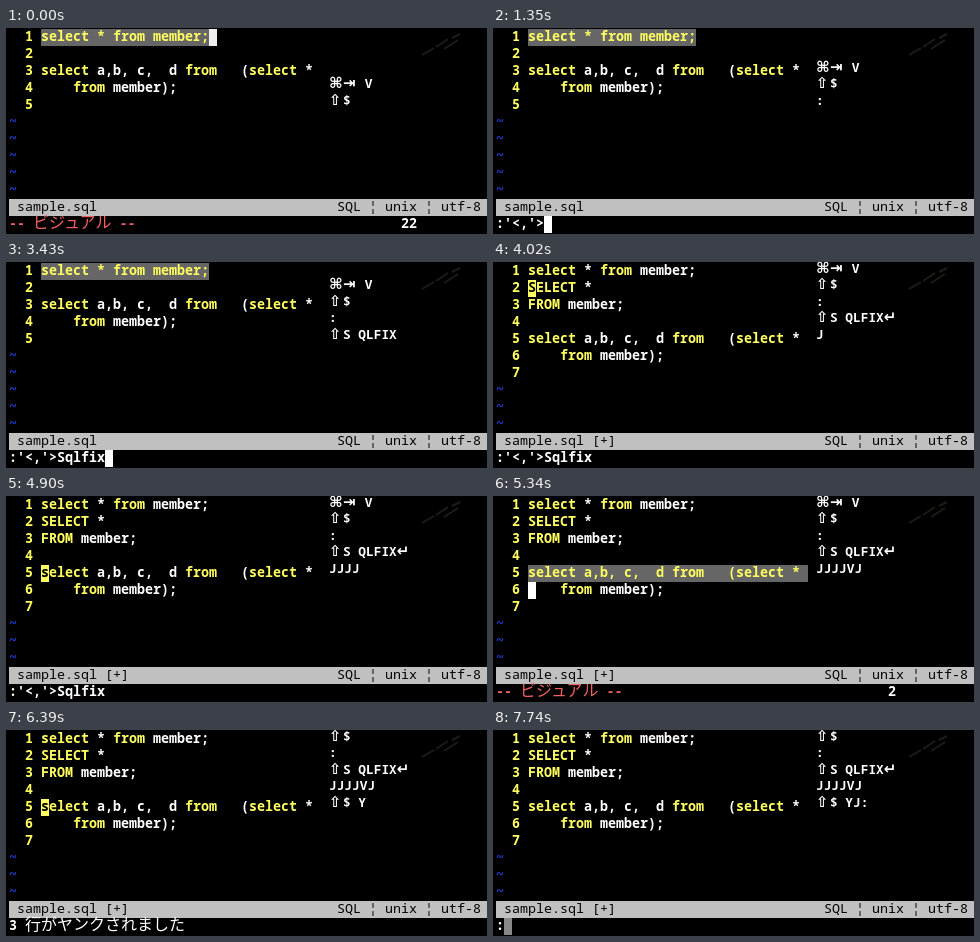
Write an HTML page that moves like this. It is 481 px wide and 206 px high and loops after 8 s.

```html
<!DOCTYPE html>
<html lang="ja">
<meta charset="utf-8">
<title>sample.sql</title>
<style>
html, body { margin: 0; width: 100%; height: 100%; overflow: hidden; background: #000; }
#stage { position: relative; width: 481px; height: 206px; overflow: hidden; }
#stage div { position: absolute; }
#stage svg { position: absolute; left: 0; top: 0; }
.text, .keys {
  white-space: pre; color: #fff; line-height: 17px;
  font: 600 13.333px/17px "Noto Sans Mono", "DejaVu Sans Mono", monospace;
}
.text b { font-weight: 600; color: #ffff60; }
.text em { font: 500 16px/0 "Noto Sans CJK JP", "Noto Sans CJK", sans-serif; }
.keys { left: 323px; font-size: 12.8px; font-weight: 700; line-height: 16.5px; }
.keys i { display: inline-block; width: 14px; font: bold 15px/0 "DejaVu Sans", sans-serif; }
</style>
<body>
<div id="stage">
  <svg width="481" height="206" fill="none" stroke="#1c1c1a" stroke-width="2">
    <path d="M416 27l12-7M430 19l12-8M438 21l14-9M446 10l8-4"/>
  </svg>
  <div id="screen"></div>
</div>
<script>
const LOOP = 8000, CELL = 8, ROW = 17, LEFT = 3, TOP = 1;
const YELLOW = '#ffff60', GREY = '#666';
const first = 'select * from member;';
const query = ['', 'select a,b, c,  d from   (select *', '    from member);', ''];
const before = [first, ...query];
const after = [first, 'SELECT *', 'FROM member;', ...query];
const range = ":'<,'>", visual = '-- ビジュアル --';

// cur: [column, row, colour]; sel: [row, length] pairs; columns count from the window edge
const at = (row, color = YELLOW) => [4, row, color];
const typed = (s, keys) => ({ cmd: range + s, cur: [6 + s.length, 11, '#fff'],
  keys: ['⌘⇥ V', '⇧$', ':', ...(keys ? [keys] : [])] });
const base = ['⌘⇥ V', '⇧$', ':', '⇧S QLFIX↵'];
const moved = (row, js, color) => ({ cur: at(row, color), keys: [...base, js] });

const steps = [
  [0, { lines: before, sel: [[0, 21]], cur: [25, 0, '#eee'], cmd: visual, count: '22', keys: ['⌘⇥ V', '⇧$'] }],
  [450, { cur: null }],
  [1350, { ...typed(''), count: '' }],
  [2100, typed('S', '⇧S')],
  [2240, typed('S', '⇧S Q')],
  [2390, typed('Sq', '⇧S Q')],
  [2540, typed('Sq', '⇧S QL')],
  [2680, typed('Sql', '⇧S QL')],
  [2980, typed('Sqlf', '⇧S QLF')],
  [3130, typed('Sqlfi', '⇧S QLFI')],
  [3280, typed('Sqlfix', '⇧S QLFI')],
  [3430, typed('Sqlfix', '⇧S QLFIX')],
  [3570, { lines: after, sel: [], cur: at(0), keys: base }],
  [4020, moved(1, 'J')],
  [4160, moved(1, 'JJ')],
  [4310, moved(2, 'JJ')],
  [4450, moved(3, 'JJJ', '#fff')],
  [4900, moved(4, 'JJJJ')],
  [5040, { ...moved(4, 'JJJJV'), cmd: visual, count: '1' }],
  [5190, { ...moved(5, 'JJJJV', '#fff'), sel: [[4, 35]], count: '2' }],
  [5340, moved(5, 'JJJJVJ', '#fff')],
  [5640, { sel: [[4, 35], [5, 17]], cur: [21, 5, '#fff'], keys: [...base, 'JJJJVJ', '⇧$'] }],
  [6390, { sel: [], cur: at(4), cmd: '3 行がヤンクされました', count: '', keys: [...base, 'JJJJVJ', '⇧$ Y'] }],
  [6990, { cur: at(5, '#fff'), keys: [...base, 'JJJJVJ', '⇧$ YJ'] }],
  [7590, { cmd: ':', cur: [1, 11, '#fff'], keys: [...base, 'JJJJVJ', '⇧$ YJ:'] }],
  [7740, { cur: [1, 11, '#888'] }],
];
const states = [];
for (const [, change] of steps) states.push({ ...states.at(-1), ...change });

const esc = s => s.replace(/&/g, '&amp;').replace(/</g, '&lt;');
const keywords = s => s.replace(/select|from/gi, '<b>$&</b>');
const wide = s => s.replace(/[ぁ-んァ-ヶ一-龠]+/g, '<em>$&</em>');
const pos = (col, y) => `left:${LEFT + col * CELL}px;top:${y}px;`;
const box = (col, row, n, color) =>
  `<div style="${pos(col, TOP + row * ROW)}width:${n * CELL}px;height:${ROW}px;background:${color}"></div>`;
const text = (col, row, html, style = '') =>
  `<div class="text" style="${pos(col, row * ROW)}${style}">${html}</div>`;

function draw({ lines, sel, cur, cmd, count, keys }) {
  let out = sel.map(([row, n]) => box(4, row, n, GREY)).join('');
  for (let row = 0; row < 10; row++) {
    const line = lines[row];
    if (line === undefined) {
      out += text(0, row, '~', 'color:#2040e0');
      continue;
    }
    const selected = sel.some(([r]) => r === row);
    out += text(2, row, `<b>${row + 1}</b>`);
    out += text(4, row, keywords(line), selected ? `color:${YELLOW}` : '');
  }

  const black = 'color:#000;font-weight:500';
  out += box(0, 10, 60, '#c0c0c0');
  out += text(1, 10, 'sample.sql' + (lines === after ? ' [+]' : ''), black);
  out += text(41, 10, 'SQL ¦ unix ¦ utf-8', black);
  out += text(0, 11, wide(esc(cmd)), cmd === visual ? 'color:#f06060' : '');
  out += text(49, 11, count);

  if (cur) {
    const [col, row, color] = cur;
    out += box(col, row, 1, color);
    out += text(col, row, lines[row]?.[col - 4] ?? '', 'color:#000');
  }

  const shown = keys.slice(-5);
  shown.forEach((k, i) => {
    const y = 80 - 16.5 * (shown.length - i);
    out += `<div class="keys" style="top:${y}px">${k.replace(/[⌘⇥⇧↵]/g, '<i>$&</i>')}</div>`;
  });
  screen.innerHTML = out;
}

const screen = document.getElementById('screen');
let last = -1;
function tick() {
  const t = performance.now() % LOOP;
  const i = steps.findLastIndex(([start]) => start <= t);
  if (i !== last) draw(states[last = i]);
  requestAnimationFrame(tick);
}
tick();
</script>
</body>
</html>
```
